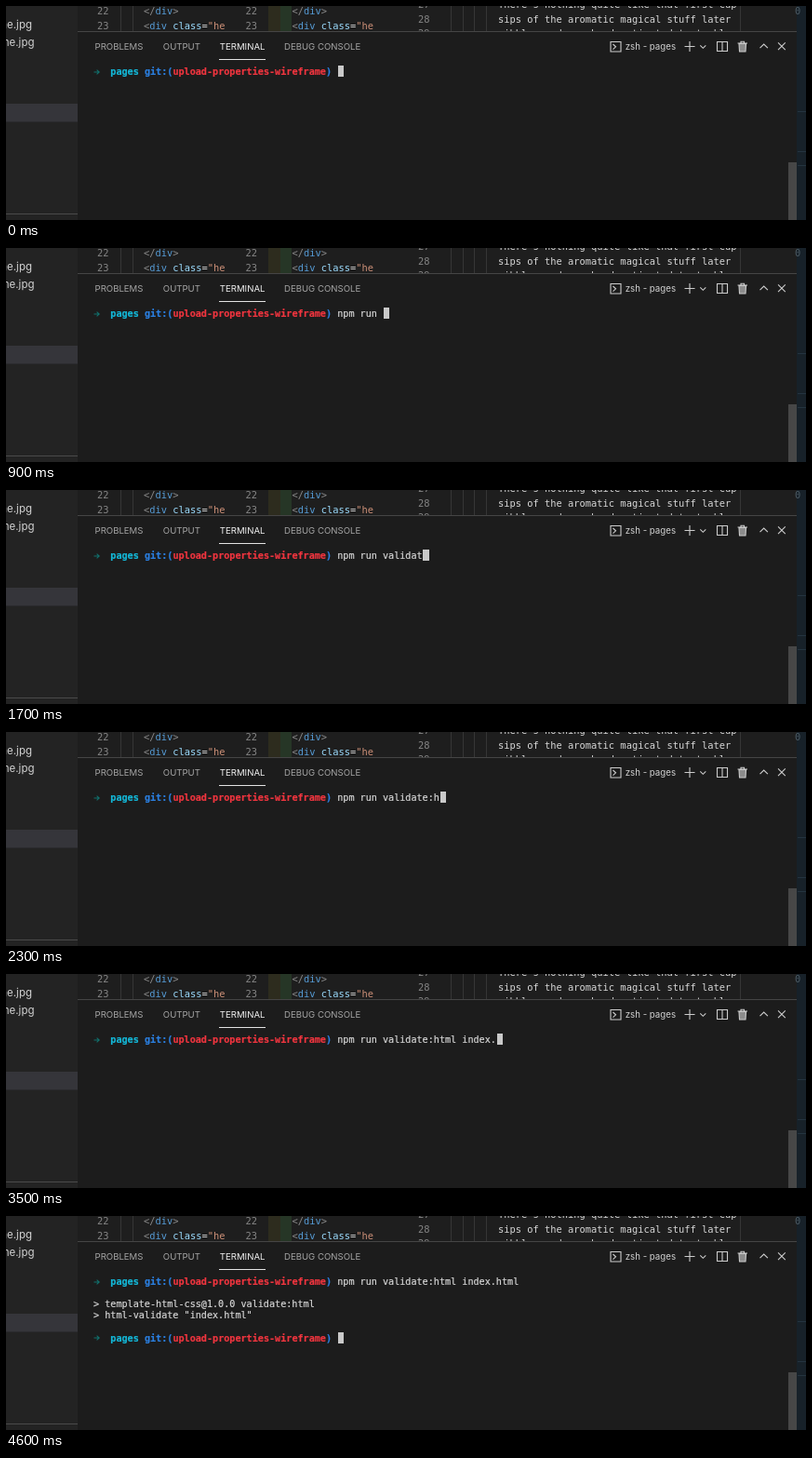
An HTML page for the animation above (4.7 s loop, 860 by 230 pixels).

```html
<!DOCTYPE html>
<html lang="en">
<head>
<meta charset="utf-8">
<title>Terminal</title>
<style>
  html, body { margin: 0; width: 100%; height: 100%; overflow: hidden; background: #1c1c1c; }
  #stage { position: relative; width: 860px; height: 230px; overflow: hidden; }
  svg { position: absolute; inset: 0; display: block; }
  .ui { font-family: Inter, "Open Sans", sans-serif; }
  .code { font: 10.4px "DejaVu Sans Mono", monospace; white-space: pre; fill: #d8d8d8; }
  .code, #term { -webkit-text-stroke: 0.2px; }
  .num { fill: #858585; }
  .punct { fill: #8a8a8a; }
  .tag { fill: #569cd6; }
  .attr { fill: #9cdcfe; }
  .str { fill: #ce9178; }
  .guide { stroke: #363636; }
  .tab { font-size: 9.6px; fill: #a4a4a4; }
  .tab.on { fill: #f0f0f0; }
  .icon { fill: none; stroke: #cccccc; stroke-width: 1.1; }
  #term {
    position: absolute; left: 94px; top: 65px; margin: 0;
    font: 10.15px/12.15px "DejaVu Sans Mono", monospace; color: #d6d6d6;
  }
  .row { position: absolute; left: 0; white-space: pre; }
  .row b:nth-of-type(1) { color: #14b8d8; }
  .row b:nth-of-type(2), .row b:nth-of-type(4) { color: #2b7fe0; }
  .row b:nth-of-type(3) { color: #f0353f; }
  .arrow { position: absolute; left: 0; top: 1.5px; }
  .arrow path { fill: none; stroke: #11706c; stroke-width: 1.1; }
  #cursor { position: absolute; width: 6.6px; height: 12px; margin-top: -0.6px; background: #c9c9c9; }
</style>
</head>
<body>
<div id="stage">
  <svg width="860" height="230" viewBox="0 0 860 230">
    <defs>
      <g id="markup" class="code">
        <text class="num" x="0" y="9.2">22</text>
        <text class="num" x="0" y="24.8">23</text>
        <text x="50" y="9.2"><tspan class="punct">&lt;/</tspan><tspan class="tag">div</tspan><tspan class="punct">&gt;</tspan></text>
        <text x="50" y="24.8"><tspan class="punct">&lt;</tspan><tspan class="tag">div</tspan> <tspan class="attr">class</tspan>=<tspan class="str">"he</tspan></text>
      </g>
    </defs>

    <rect width="860" height="230" fill="#1e1e1e"/>
    <path class="guide" d="M123.5 0V27M136.5 0V27"/>
    <use href="#markup" x="98"/>
    <rect x="236" width="160" height="27" fill="#1e1e1e"/>
    <rect x="282" width="13" height="27" fill="#2d2c1e"/>
    <rect x="295" width="12" height="27" fill="#263626"/>
    <use href="#markup" x="257.5"/>
    <path class="guide" d="M478.5 0V27M491.5 0V27M503.5 0V27M516.5 0V27M789.5 0V27"/>
    <g class="code">
      <text class="num" x="443" y="2.1">27</text>
      <text class="num" x="443" y="17.7">28</text>
      <text class="num" x="443" y="33.1">29</text>
      <text x="529" y="2.1">There's nothing quite like that first cup</text>
      <text x="529" y="17.7">sips of the aromatic magical stuff later</text>
      <text x="529" y="33.1">nibbles and now hard motivated to tackle</text>
    </g>

    <rect x="77" y="27" width="774" height="203" fill="#1c1c1c"/>
    <path d="M77 27.5H850" stroke="#454545"/>
    <rect x="841" y="168" width="9" height="62" fill="#474747"/>
    <rect x="850" width="10" height="230" fill="#172129"/>
    <path d="M851 113.5H860M851 156.5H860M851 171.5H860" stroke="#243440"/>
    <text class="code" x="848" y="9" style="fill:#4b5a63">0</text>

    <rect width="77" height="230" fill="#232323"/>
    <rect y="105" width="77" height="19.5" fill="#35353a"/>
    <path d="M0 223.5H77" stroke="#4a4a4a"/>
    <g class="ui" font-size="11.5" fill="#d2d2d2" text-anchor="end">
      <text x="28" y="23.6">frame.jpg</text>
      <text x="30.5" y="42.8">frame.jpg</text>
    </g>

    <g class="ui">
      <text class="tab" x="95.5" y="47.2">PROBLEMS</text>
      <text class="tab" x="168.8" y="47.2">OUTPUT</text>
      <text class="tab on" x="229.8" y="47.2">TERMINAL</text>
      <text class="tab" x="299" y="47.2">DEBUG CONSOLE</text>
      <text id="shell" x="720" y="47.2" font-size="9.7" fill="#d2d2d2" text-anchor="end">zsh - pages</text>
    </g>
    <path d="M229 57.5H279" stroke="#e4e4e4"/>

    <g class="icon">
      <path id="shellIcon" d="M650 38.5h11v10.5h-11zM652.5 41l3 2.8-3 2.8"/>
      <path d="M729.5 43.5h11M735 38v11M746.3 42.3l3 3 3-3"/>
      <path d="M764.5 38.5h11v10h-11zM770 38.5v10"/>
      <path d="M788 40.5h7.5l-.5 8.5h-6.5z" fill="#8c8c8c"/>
      <path d="M786.5 40h10.5M790 40v-1.7h3.5v1.7"/>
      <path d="M810.5 45.2l4.2-4.2 4.2 4.2M830 39.3l7.8 7.8M837.8 39.3l-7.8 7.8"/>
    </g>
  </svg>

  <div id="term">
    <div class="row" id="first"></div>
    <div class="row" id="banner">&gt; template-html-css@1.0.0 validate:html
&gt; html-validate "index.html"</div>
    <div class="row" id="last"></div>
    <div id="cursor"></div>
  </div>
</div>

<script>
  const LOOP = 4700, STEP = 100;
  const CELL = 6.11, LINE = 12.15, PROMPT = 43;
  const ENTER = 4100, BUSY = 4200, OUTPUT = 4400, DONE = 4600;
  const command = "npm run validate:html index.html";
  // [time, characters typed]
  const typing = [[0, 0], [900, 8], [1700, 15], [2300, 18], [3500, 28], [3900, 32]];

  const $ = id => document.getElementById(id);
  const promptHtml = `<svg class="arrow" width="8" height="8"><path d="M0.5 4H6M3.6 1.6L6.2 4L3.6 6.4"/></svg>` +
    "   <b>pages</b> <b>git:(</b><b>upload-properties-wireframe</b><b>)</b> ";

  $("first").innerHTML = promptHtml + "<span></span>";
  $("last").innerHTML = promptHtml;
  $("banner").style.top = 2 * LINE + "px";
  $("last").style.top = 5 * LINE + "px";
  const typed = $("first").lastChild;

  function typedCount(t) {
    for (let i = 1; i < typing.length; i++) {
      const [t0, n0] = typing[i - 1], [t1, n1] = typing[i];
      if (t < t1) return Math.floor(n0 + (n1 - n0) * (t - t0) / (t1 - t0));
    }
    return command.length;
  }

  function cursorCell(t, count) {
    if (t < ENTER) return [PROMPT + count, 0];
    if (t < OUTPUT) return [0, 1];
    return t < DONE ? [0, 5] : [PROMPT, 5];
  }

  const show = (id, on) => { $(id).style.visibility = on ? "visible" : "hidden"; };

  function draw(t) {
    const count = typedCount(t);
    const [col, row] = cursorCell(t, count);
    const busy = t >= BUSY && t < DONE;
    typed.textContent = command.slice(0, count);
    $("cursor").style.left = col * CELL + "px";
    $("cursor").style.top = row * LINE + "px";
    show("banner", t >= OUTPUT);
    show("last", t >= DONE);
    $("shell").textContent = (busy ? "node" : "zsh") + " - pages";
    $("shellIcon").setAttribute("transform", `translate(${busy ? -7 : 0} 0)`);
  }

  const start = performance.now();
  function tick() {
    const t = (performance.now() - start) % LOOP;
    draw(Math.floor(t / STEP) * STEP);
    requestAnimationFrame(tick);
  }
  tick();
</script>
</body>
</html>
```
